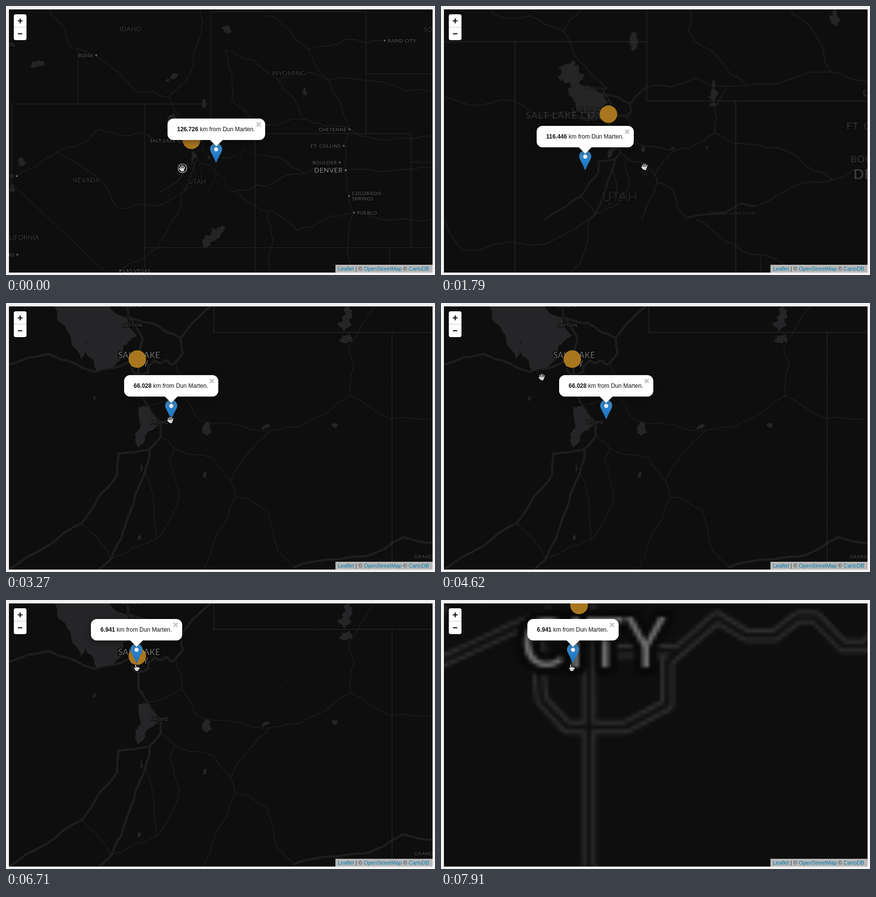
An HTML page with a canvas for the animation above (8 s loop, 879 by 552 pixels).

```html
<!DOCTYPE html>
<html lang="en">
<head>
<meta charset="utf-8">
<title>Distance map</title>
<style>
html, body { margin: 0; width: 100%; height: 100%; overflow: hidden; background: #f2f2f2; }
canvas { display: block; }
</style>
</head>
<body>
<canvas id="stage" width="879" height="552"></canvas>
<script>
const W = 879, H = 552, LOOP = 8000, BEAT = 150;
const ctx = document.getElementById('stage').getContext('2d');
const SANS = '"Liberation Sans", Arial, sans-serif';
const PLACE = 'Dun Marten';

// Three tile levels: overview, middle, close-up. Each doubles the last around HOME.
const HOME = [417, 329];
const LEVEL_SCALE = [0.25, 0.5, 1];

// Towns and junctions that the roads connect, in overview pixels.
const wideTowns = {
  nw: [88, 7], ontario: [128, 82], boise: [185, 101], twin: [262, 172], tremont: [334, 190], ogden: [376, 247],
  butte: [398, 7], pocatello: [384, 108], west: [7, 345], reno: [22, 349], winnemucca: [104, 300],
  elko: [190, 252], wendover: [284, 262], gate: [314, 278], evanston: [418, 248], rocksprings: [522, 246],
  rawlins: [608, 232], laramie: [676, 246], cheyenne: [704, 253], sidney: [874, 266], craig: [531, 306],
  junction: [531, 370], vail: [610, 343], denver: [696, 337], limon: [874, 332], billings: [530, 20],
  buffalo: [620, 90], casper: [662, 152], springs: [703, 390], pueblo: [713, 424], lajunta: [874, 436],
  trinidad: [704, 547], durango: [536, 420], farmington: [540, 547], salida: [596, 460], ely: [230, 415],
  delta: [360, 383], beaver: [326, 470], vegas: [234, 543], jackson: [448, 90], kemmerer: [462, 190],
  lander: [556, 150], rapid: [776, 71], scotts: [874, 176], moab: [470, 383]
};
const wideRoutes = [
  'nw ontario boise twin tremont ogden', 'butte pocatello tremont', 'west reno winnemucca elko wendover gate',
  'evanston rocksprings rawlins laramie cheyenne sidney', 'craig vail', 'junction vail denver limon',
  'billings buffalo casper cheyenne denver springs pueblo trinidad', 'lajunta pueblo salida durango moab',
  'durango farmington', 'delta beaver vegas', 'winnemucca ely delta', 'jackson kemmerer rocksprings',
  'jackson lander casper scotts', 'lander rawlins', 'buffalo rapid'
];
// The same for close-up pixels.
const nearTowns = {
  salt: [6, 126], tooele: [88, 105], magna: [182, 141], airport: [262, 117], top: [248, 7], ogden: [250, 28],
  farm: [280, 74], city: [271, 118], draper: [271, 182], lehi: [290, 210], provo: [317, 248], spanish: [317, 273],
  santaquin: [295, 299], nephi: [285, 347], scipio: [250, 440], fillmore: [215, 525], south: [190, 547],
  park: [362, 104], coalville: [358, 72], mountain: [302, 42], evanston: [420, 7], eureka: [230, 309],
  lynn: [228, 352], delta: [155, 452], west: [6, 547], ridge: [348, 124], heber: [361, 183], fruit: [391, 236],
  duchesne: [470, 250], vernal: [541, 262], naples: [605, 252], rangely: [705, 190], gorge: [713, 130],
  manila: [702, 90], north: [757, 7], bend: [790, 238], craig: [874, 238], soldier: [345, 297],
  helper: [425, 318], price: [460, 365], castle: [470, 397], green: [535, 424], crescent: [557, 510],
  grand: [590, 542], loma: [735, 520], mesa: [812, 481], east: [874, 492], emery: [430, 480],
  fremont: [405, 547], fairview: [335, 323], manti: [355, 390], salina: [308, 485]
};
const majorRoutes = [
  'salt tooele magna airport', 'top ogden farm city', 'draper lehi provo spanish santaquin nephi scipio fillmore south',
  'park coalville mountain ogden', 'coalville evanston', 'santaquin eureka lynn delta west', 'grand loma mesa east'
];
const minorRoutes = [
  'ridge heber fruit duchesne vernal naples rangely bend craig', 'rangely gorge manila north', 'heber lehi',
  'spanish soldier helper price castle green crescent grand', 'price vernal', 'castle emery fremont',
  'soldier fairview manti salina', 'nephi salina fillmore', 'delta fillmore'
];
const beltway = new Path2D('M271.5 116V184M258.6 117V132.5L259.3 139.4 265.9 146.5H281L291.8 140.6V129.4' +
  'L304.6 118.1 312.4 122.8H319.3L325.5 118.1H330L337.4 125.6H343L362 104M278.6 126.8H293.6');
const borders = [
  'M12 201H419.2V12H738V261.8M148 86V201M284 201V540M12 201V365L205 547',
  'M419.2 201V261.8H830V496M510.5 261.8V547M284 496H874M738 139H874M830 321H874M786 496V547'
].map(d => new Path2D(d));

// Lakes: [x, y, half width, half height, tilt]
const wideLakes = [
  [342, 234, 11, 13, 0], [406, 200, 4, 10, 0], [453, 48, 8, 9, 0], [64, 121, 15, 7, -0.3], [32, 319, 6, 11, -0.4],
  [12, 374, 5, 10, 0], [426, 474, 32, 6, -0.8], [612, 176, 5, 9, 0], [488, 251, 3, 11, 0], [340, 147, 15, 5, -0.6]
];
const nearLakes = [
  [411, 258, 9, 14, 0.3], [696, 32, 8, 26, 0.1], [696, 74, 13, 8, 0], [673, 251, 6, 5, 0],
  [181, 196, 2, 6, 0.6], [407, 352, 3, 7, 0.3], [277, 337, 2, 9, 0], [273, 481, 3, 6, 0.3], [532, 254, 9, 4, -0.5]
];
const bigLakes = [
  [[98, 7], [104, 32], [136, 88], [153, 117], [164, 72], [186, 139], [234, 118], [240, 88], [268, 66], [212, 7]],
  [[271, 214], [293, 214], [313, 250], [288, 267], [271, 297], [265, 268], [276, 254]]
];

let seed = 1;
const random = () => (seed = seed * 16807 % 2147483647) / 2147483647;

// Splits each stretch three times, pushing the midpoints sideways.
function wander(points, rough) {
  seed = Math.round(points[0][0] * 31 + points.at(-1)[1] * 7) + 100;
  for (let pass = 0; pass < 3; pass++) {
    points = points.flatMap(([x, y], i) => {
      if (i === points.length - 1) return [[x, y]];
      const [nx, ny] = points[i + 1], push = (random() - 0.5) * rough;
      return [[x, y], [(x + nx) / 2 - (ny - y) * push, (y + ny) / 2 + (nx - x) * push]];
    });
  }
  return new Path2D('M' + points.join('L'));
}
const roads = (routes, towns, rough) => routes.map(route => wander(route.split(' ').map(name => towns[name]), rough));
const lakes = list => list.map(([x, y, rx, ry, tilt]) => {
  const ring = Array.from({ length: 9 }, (_, i) => {
    const a = i * Math.PI / 4, u = rx * Math.cos(a), v = ry * Math.sin(a);
    return [x + u * Math.cos(tilt) - v * Math.sin(tilt), y + u * Math.sin(tilt) + v * Math.cos(tilt)];
  });
  return wander(ring, 0.9);
});
const shapes = {
  wideRoads: roads(wideRoutes, wideTowns, 0.22),
  major: [...roads(majorRoutes, nearTowns, 0.1), beltway],
  minor: roads(minorRoutes, nearTowns, 0.14),
  wideLakes: lakes(wideLakes),
  nearLakes: [...lakes(nearLakes), ...bigLakes.map(shore => wander([...shore, shore[0]], 0.3))]
};

const STYLE = [
  { road: '#262626', minor: '#202020', minorWidth: 1, border: '#292929', water: '#242424' },
  { road: '#2c2c2c', minor: '#222', minorWidth: 2, border: '#3a3a3a', water: '#262729' },
  { road: '#303030', minor: '#212121', minorWidth: 1.2, border: '#363636', water: '#252527' }
];

function drawLevel(level) {
  const canvas = Object.assign(document.createElement('canvas'), { width: W, height: H });
  const c = canvas.getContext('2d');
  const style = STYLE[level], near = LEVEL_SCALE[level], wide = near * 4;
  let zoom;
  const useZoom = z => {
    zoom = z;
    c.setTransform(z, 0, 0, z, HOME[0] * (1 - z), HOME[1] * (1 - z));
  };
  const stroke = (paths, color, width) => {
    c.strokeStyle = color;
    c.lineWidth = width / zoom;
    paths.forEach(path => c.stroke(path));
  };
  const fill = paths => {
    c.fillStyle = style.water;
    paths.forEach(path => c.fill(path));
  };
  c.fillStyle = '#0e0e0e';
  c.fillRect(0, 0, W, H);
  c.lineJoin = 'round';
  if (level < 2) {
    useZoom(wide);
    fill(shapes.wideLakes);
    stroke(shapes.wideRoads, '#222', 1.2);
  }
  useZoom(near);
  fill(shapes.nearLakes);
  if (level === 2) drawSpeckles(c);
  stroke(shapes.minor, style.minor, style.minorWidth);
  stroke(shapes.major, style.road, level ? 3.5 : 1.3);
  if (level) stroke(shapes.major, '#101010', 1.5);
  useZoom(wide);
  if (level) c.setLineDash([2 / zoom, 1.6 / zoom]);
  stroke(borders, style.border, level ? 1.4 : 1);
  c.setTransform(1, 0, 0, 1, 0, 0);
  c.setLineDash([]);
  drawLabels[level](c);
  return canvas;
}

function drawSpeckles(c) {
  seed = 7;
  c.fillStyle = '#1b1b1b';
  for (let i = 0; i < 75; i++) c.fillRect(370 + random() * 230, 70 + random() * 110, 1 + random() * 2, 1 + random());
}

function label(c, text, x, y, color, size = 10, align = 'center', spacing = 0.4) {
  c.font = `${size}px Lato, sans-serif`;
  c.letterSpacing = spacing + 'px';
  c.textAlign = align;
  c.strokeStyle = '#090909';
  c.lineWidth = size / 4;
  c.fillStyle = color;
  text.split('\n').forEach((line, i) => {
    c.strokeText(line, x, y + i * size * 1.1);
    c.fillText(line, x, y + i * size * 1.1);
  });
}

// A dot with its name on the left (side -1) or the right (side 1).
function town(c, text, [x, y], side, color = '#626262', size = 10) {
  const top = text.includes('\n') ? y - 2 : y + size * 0.35;
  label(c, text, x + side * 6, top, color, size, side < 0 ? 'right' : 'left', 0.5);
  c.beginPath();
  c.arc(x, y, 1.9, 0, 7);
  c.fill();
}

const drawLabels = [
  c => {
    const state = (text, x, y) => label(c, text, x, y, '#3a3a3a', 13.3, 'center', 0.2);
    state('IDAHO', 255, 52);
    state('WYOMING', 579, 143);
    state('NEVADA', 164, 362);
    state('UTAH', 391.5, 365);
    state('CALIFORNIA', 28, 480);
    state('OREGON', -10, 84);
    state('SOUTH DAKOTA', 908, 53);
    const { boise, cheyenne, denver, pueblo, springs, rapid, vegas, reno } = wideTowns;
    town(c, 'BOISE', boise, -1);
    town(c, 'CHEYENNE', cheyenne, -1);
    town(c, 'FT. COLLINS', [692, 287], -1);
    town(c, 'BOULDER', [684, 321], -1);
    town(c, 'DENVER', denver, -1, '#8a8a8a', 14);
    town(c, 'SALT LAKE CITY', [381, 276], -1);
    town(c, 'RENO', reno, -1);
    town(c, 'FRESNO', [23, 510], -1);
    town(c, 'RAPID CITY', rapid, 1);
    town(c, 'COLORADO\nSPRINGS', springs, 1);
    town(c, 'PUEBLO', pueblo, 1);
    town(c, 'LAS VEGAS', vegas, 1);
  },
  c => {
    label(c, 'SALT LAKE\nCITY', 339.5, 219, '#5c5c5c', 14.2, 'right');
    label(c, 'UTAH', 364, 395, '#424242', 13.5);
    label(c, 'GRAND JUNCTION', 597, 428.5, '#545454', 10);
    town(c, 'PROVO', [367, 286.5], -1, '#505050');
    town(c, 'OGDEN', [338, 168], -1, '#505050');
  },
  c => {
    label(c, 'SALT LAKE\nCITY', 273, 113, '#707070', 16.8);
    label(c, 'OGDEN', 258, 10, '#444');
    label(c, 'LAYTON', 259, 49, '#505050');
    label(c, 'PROVO', 314.5, 247.5, '#505050');
    label(c, 'GRAND JUNCTION', 884, 524, '#505050');
  }
];
const levels = LEVEL_SCALE.map((_, level) => drawLevel(level));

// Everything advances in beats.
const beats = (t, start) => Math.max(0, Math.floor((t - start) / BEAT) + 1);
const zoomStarts = [1490, 2230, 7160, 7460, 7760];
const tilesReady = [-BEAT, 1790, 2670];
// [time, x, y, distance], close-up pixels
const pins = [
  [-BEAT, 473, 301, '126.726'], [450, 173.2, 345, '116.446'], [3120, 338.5, 239, '66.028'],
  [5220, 214.5, 151, '30.28'], [6410, 267.4, 130, '6.941']
];
// [time, beats, x, y]
const moves = [
  [0, 1, 361, 333], [150, 1, 356, 333], [890, 2, 417, 330], [3120, 1, 337, 240], [4020, 6, 202, 149],
  [5070, 2, 214, 152], [5510, 1, 227, 159], [5660, 4, 268, 139]
];
const POINTING_FROM = 5510;

// Each zoom doubles the scale, nearly all of it on the first beat.
const scaleAt = t => 2 ** zoomStarts.reduce((sum, start) => sum + 1 - 0.115 ** beats(t, start), -2);

const cursorAt = t => moves.reduce(([x, y], [start, count, nx, ny]) => {
  const part = Math.sin(Math.min(1, beats(t, start) / count) * Math.PI / 2);
  return [x + (nx - x) * part, y + (ny - y) * part];
}, [0, 0]);

function drawText(text, x, y, font, color) {
  ctx.font = font + ' ' + SANS;
  ctx.fillStyle = color;
  ctx.fillText(text, x, y);
  return x + ctx.measureText(text).width;
}

function drawLines(path, color, width) {
  ctx.strokeStyle = color;
  ctx.lineWidth = width;
  ctx.stroke(new Path2D(path));
}

function disc(x, y, r, color) {
  ctx.beginPath();
  ctx.arc(x, y, r, 0, 7);
  ctx.fillStyle = color;
  ctx.fill();
}

function drawPin(x, y) {
  ctx.save();
  ctx.translate(x - 12.5, y - 41);
  const blue = ctx.createLinearGradient(0, 0, 0, 41);
  blue.addColorStop(0, '#4393cd');
  blue.addColorStop(1, '#126fc6');
  ctx.fillStyle = blue;
  const shape = 'M12.5 .5C5.8 .5 .5 5.9 .5 12.5 .5 18.5 5.5 23 12.5 40.5 19.5 23 24.5 18.5 24.5 12.5 24.5 5.9 19.2 .5 12.5 .5Z';
  ctx.fill(new Path2D(shape));
  drawLines(shape, '#2f74a8', 1);
  disc(12.5, 13, 4.2, '#fff');
  ctx.restore();
}

function drawPopup(left, top, width, distance, alpha) {
  ctx.save();
  ctx.globalAlpha = alpha;
  ctx.translate(left, top);
  ctx.fillStyle = '#fff';
  ctx.shadowColor = 'rgba(0,0,0,.4)';
  ctx.shadowBlur = 14;
  ctx.shadowOffsetY = 3;
  const mid = width / 2;
  ctx.beginPath();
  ctx.roundRect(0, 0, width, 44, 12);
  ctx.moveTo(mid - 13, 43.9);
  ctx.lineTo(mid, 57);
  ctx.lineTo(mid + 13, 43.9);
  ctx.fill();
  ctx.shadowColor = 'transparent';
  const x = drawText(distance, 19.5, 26, 'bold 12px', '#111');
  drawText(` km from ${PLACE}.`, x, 26, '12px', '#111');
  ctx.translate(width - 13.5, 12);
  drawLines('M-4-4L4 4M4-4L-4 4', '#c3c3c3', 2.6);
  ctx.restore();
}

const OPEN_HAND = 'M-3.4 1L-4.4-3.8M-.9 0L-1.1-6M1.7 0L2.1-5.6M4.1 1L5.2-3.2M-3 4L-6 .4';
const POINTING_HAND = 'M-2 1L-2.6-6M.4 1V-1.4M2.8 1V-.8M5 2V.2M-2 4L-5 .6';

function drawCursor(x, y, pointing, pressed) {
  const fingers = pointing ? POINTING_HAND : OPEN_HAND;
  const palm = 'M-3 .5L4 .5 4.5 2.5 2.8 6.5H-1.6L-3.6 3.5Z';
  ctx.save();
  ctx.translate(x, y);
  ctx.lineCap = ctx.lineJoin = 'round';
  if (pressed) {
    disc(0.5, 0, 9.5, '#ddd');
    disc(0.5, 0, 8.4, '#0a0a0a');
  }
  drawLines(fingers + palm, '#000', 3.2);
  drawLines(fingers, '#fff', 1.5);
  ctx.fillStyle = '#fff';
  ctx.fill(new Path2D(palm));
  drawLines('M-.6 2.6V5M1.2 2.6V5M3 2.6V4.6', '#555', 0.6);
  ctx.restore();
}

function drawControls() {
  ctx.fillStyle = '#fff';
  ctx.beginPath();
  ctx.roundRect(16, 17, 26, 53, 4);
  ctx.fill();
  drawLines('M16 43.5H42', '#ccc', 1);
  drawLines('M24 30.5H34M29 25.5V35.5M24.5 57H33.5', '#000', 2);
  ctx.fillStyle = 'rgba(255,255,255,.7)';
  ctx.fillRect(675, 531, 199, 16);
  const credits = ['Leaflet', ' | © ', 'OpenStreetMap', ' © ', 'CartoDB'];
  credits.reduce((x, text, i) => drawText(text, x, 543, '11px', i % 2 ? '#333' : '#0078a8'), 680);
}

function draw(t) {
  const scale = scaleAt(t);
  const [fx, fy] = t < 3000 ? HOME : [267, 130];
  const project = (x, y) => [fx + (x - fx) * scale, fy + (y - fy) * scale];

  ctx.fillStyle = '#f2f2f2';
  ctx.fillRect(0, 0, W, H);
  ctx.save();
  ctx.beginPath();
  ctx.rect(6, 7, 868, 540);
  ctx.clip();
  levels.forEach((tiles, level) => {
    const k = scale / LEVEL_SCALE[level];
    ctx.globalAlpha = Math.min(1, beats(t, tilesReady[level]) / 2);
    ctx.drawImage(tiles, fx * (1 - k), fy * (1 - k), W * k, H * k);
  });
  ctx.globalAlpha = 1;
  disc(...project(269, 115), 18, '#a8761f');

  const [start, px, py, distance] = pins.findLast(pin => pin[0] <= t);
  const [x, y] = project(px, py);
  ctx.font = 'bold 12px ' + SANS;
  let textWidth = ctx.measureText(distance).width;
  ctx.font = '12px ' + SANS;
  textWidth += ctx.measureText(` km from ${PLACE}.`).width;
  const width = Math.floor(textWidth + 0.2) + 41;
  const left = Math.ceil(x - width / 2), tipY = Math.round(y);
  drawPin(left + Math.floor((width - 1) / 2) + 0.5, tipY);
  drawPopup(left, tipY - 91, width, distance, t - start < BEAT ? 0.6 : 1);

  drawControls();
  drawCursor(...cursorAt(t), t >= POINTING_FROM, t < BEAT);
  ctx.restore();
}

const begin = performance.now();
function frame() {
  draw((performance.now() - begin) % LOOP);
  requestAnimationFrame(frame);
}
frame();
</script>
</body>
</html>
```
